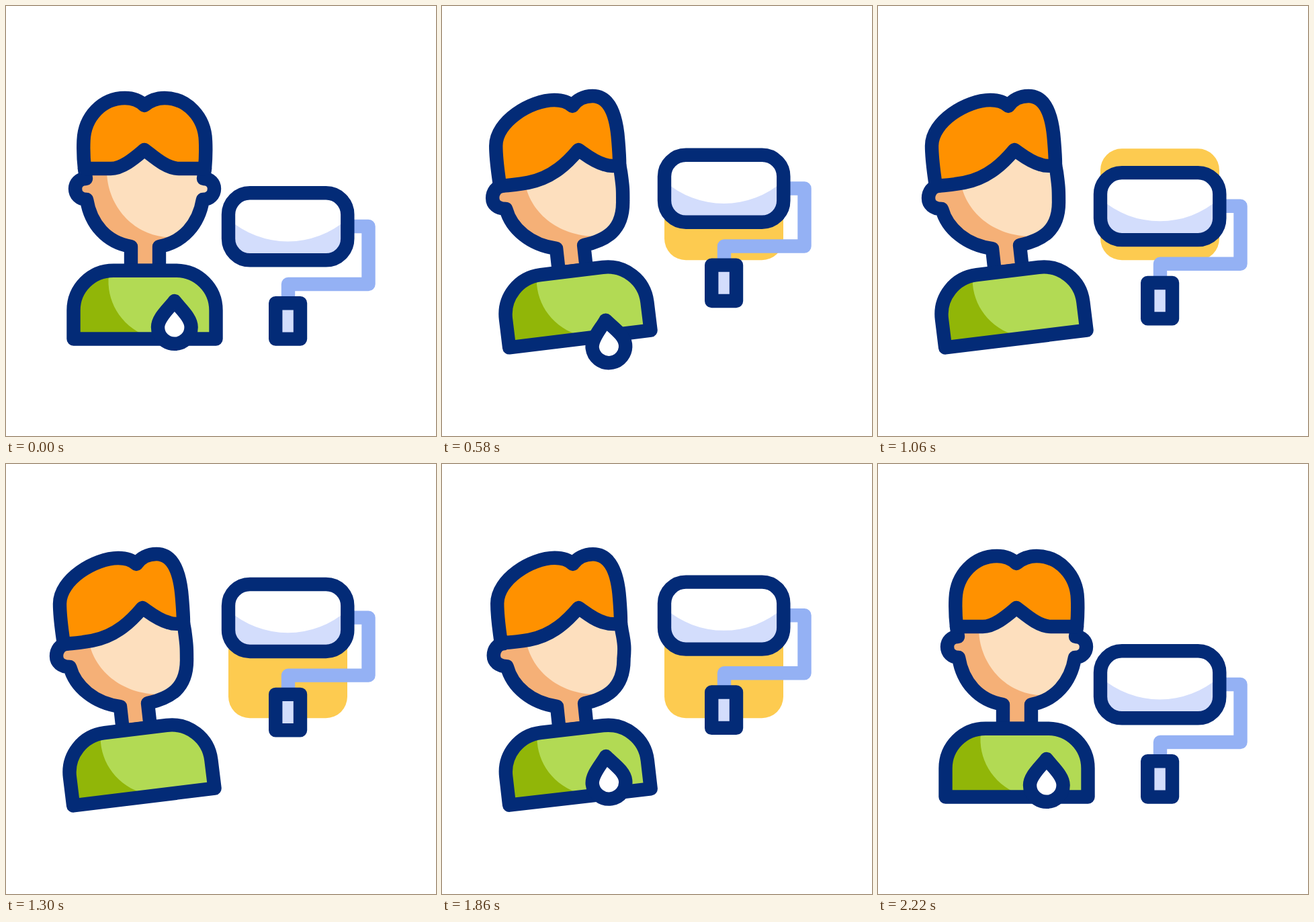
An HTML page for the animation above (2.4 s loop, 640 by 640 pixels).

```html
<!DOCTYPE html>
<html lang="en">
<head>
<meta charset="utf-8">
<title>Painter</title>
<style>
  html, body { margin: 0; width: 100%; height: 100%; overflow: hidden; background: #fff; }
  svg { display: block; width: 100%; height: 100%; }
  .line { stroke: #032b77; stroke-width: 20.4; stroke-linejoin: round; stroke-linecap: round; }
</style>
</head>
<body>
<svg viewBox="0 0 640 640">
  <rect id="paint" x="331" width="177" rx="32" fill="#fdcb50"/>
  <g id="roller">
    <path d="M508 328H539.5V414H420V442" fill="none" stroke="#94b1f4" stroke-width="20.4" stroke-linejoin="round"/>
    <rect x="331" y="278.3" width="177.3" height="100" rx="32" fill="#fff"/>
    <path d="M331 317A133.6 133.6 0 0 0 508 317V346A32 32 0 0 1 476 378H363A32 32 0 0 1 331 346Z" fill="#d3ddfc"/>
    <rect class="line" x="331" y="278.3" width="177.3" height="100" rx="32" fill="none"/>
    <rect class="line" x="401.2" y="442.2" width="36.8" height="53.4" fill="#d3ddfc"/>
  </g>

  <path id="face" fill="#f5b077"/>
  <path id="light" fill="#fddfbe"/>
  <path id="outline" class="line" fill="none"/>
  <path id="hair" class="line" fill="#ff9100"/>

  <g id="body">
    <path d="M100.5 495.5V453C100.5 420 127 393.7 160 393.7H253C286 393.7 312.5 420 312.5 453V495.5Z" fill="#b2da54"/>
    <path d="M100.5 495.5V453C100.5 420 127 393.7 160 393.7H154C147 430 164 469 202 488V495.5Z" fill="#91b608"/>
    <path class="line" d="M100.5 495.5V453C100.5 420 127 393.7 160 393.7H253C286 393.7 312.5 420 312.5 453V495.5Z" fill="none"/>
  </g>

  <path id="drop" class="line" fill="#fff"
    d="M250.8 439C242 451 226 464 226 478A24.8 24.8 0 0 0 275.6 478C275.6 464 260 451 250.8 439Z"/>
</svg>
<script>
const LOOP = 2400;
const part = id => document.getElementById(id);

// Each shape has a front pose and a turned pose with the same commands.
const hair = [
  `M117 242 C115 225 115 212 115.5 200 C117 165 143 137 177 137 C190 137 200 142 206 148
   C213 142 223 137 236 137 C269 137 296 165 297 201 C297.5 212 297.5 225 296 242
   C283 242 270 242 257 242 C238 242 217 222 206 214 C196 222 175 242 156 242
   C143 242 130 242 117 242 Z`,
  `M86 268 C83 248 80 225 80 208 C80 172 132 140 167 140 C178 140 188 143 194 149
   C200 140 211 134 224 134 C248 134 259 160 262 200 C263 212 264 225 264 237
   C258 238 250 239 242 236 C226 232 212 220 203 214 C188 232 165 256 128 263
   C112 266 100 267 86 268 Z`
];
const face = [
  `M117 242 L119 257 C109 257 103 264 103 272 C103 281 110 288 120 288
   C126 325 150 352 186 358 L186 394 L228 394 L228 358 C263 352 287 325 293 288
   C303 288 310 281 310 272 C310 264 304 257 294 257 L296 242`,
  `M86 268 L90 268 C81 268 75 277 75 286 C75 295 82 302 95 302
   C103 332 132 356 170 361 L174 397 L215 392 L211 356 C243 349 270 335 269 290
   C269 283 269 276 268.5 270 C268 263 267 256 266 248 L264 237`
];
const light = [
  `M150 240 C148 295 188 341 240 344 C265 335 285 310 293 288
   C303 288 310 281 310 272 C310 264 304 257 294 257 L296 242 L206 214 Z`,
  `M123 262 C130 305 170 343 230 343 C250 335 262 315 269 290
   C269 283 269 276 268.5 270 C268 263 267 256 266 248 L264 237 L203 214 Z`
];

const mix = (a, b, k) => a + (b - a) * k;
const ramp = (t, from, to) => Math.min(1, Math.max(0, (t - from) / (to - from)));
const ease = (t, from, to) => {
  const x = ramp(t, from, to);
  return x * x * (3 - 2 * x);
};

function morph([front, turned], k) {
  const ends = turned.match(/[\d.]+/g);
  let i = 0;
  return front.replace(/[\d.]+/g, n => mix(+n, +ends[i++], k).toFixed(2));
}

// Roller stops: [time, lift]
const stops = [[200, 0], [700, -66], [1000, -26], [1600, -172], [2200, 0]];
function rollerLift(t) {
  let y = 0;
  for (let i = 1; i < stops.length; i++) {
    const [t0, y0] = stops[i - 1], [t1, y1] = stops[i];
    y += (y1 - y0) * ease(t, t0, t1);
  }
  return y;
}

function dropState(t) {
  if (t < 1100) return { y: 76.5 * ease(t, 400, 800), alpha: 1 - ramp(t, 680, 860) };
  return { y: -76 * (1 - ease(t, 1340, 1740)), alpha: ramp(t, 1340, 1480) };
}

function draw(t) {
  const turn = ease(t, 200, 600) - ease(t, 1800, 2200);
  const outline = morph(face, turn);
  part('face').setAttribute('d', outline);
  part('outline').setAttribute('d', outline);
  part('light').setAttribute('d', morph(light, turn));
  part('hair').setAttribute('d', morph(hair, turn));
  part('body').setAttribute('transform', `rotate(${-7 * turn} 206.5 505)`);

  const lift = rollerLift(t);
  // The painted area keeps the first stroke's height while the roller dips.
  const reach = t > 700 && t < 1600 ? Math.min(lift, -66) : lift;
  part('roller').setAttribute('transform', `translate(0 ${lift})`);
  part('paint').setAttribute('y', 278.3 + reach);
  part('paint').setAttribute('height', 100 - reach);

  const { y, alpha } = dropState(t);
  part('drop').setAttribute('transform',
    `translate(${-2.5 * turn} ${y - 4.5 * turn}) rotate(${-7 * turn} 250.8 478)`);
  part('drop').setAttribute('opacity', alpha);
}

const start = performance.now();
function tick() {
  draw((performance.now() - start) % LOOP);
  requestAnimationFrame(tick);
}
tick();
</script>
</body>
</html>
```
